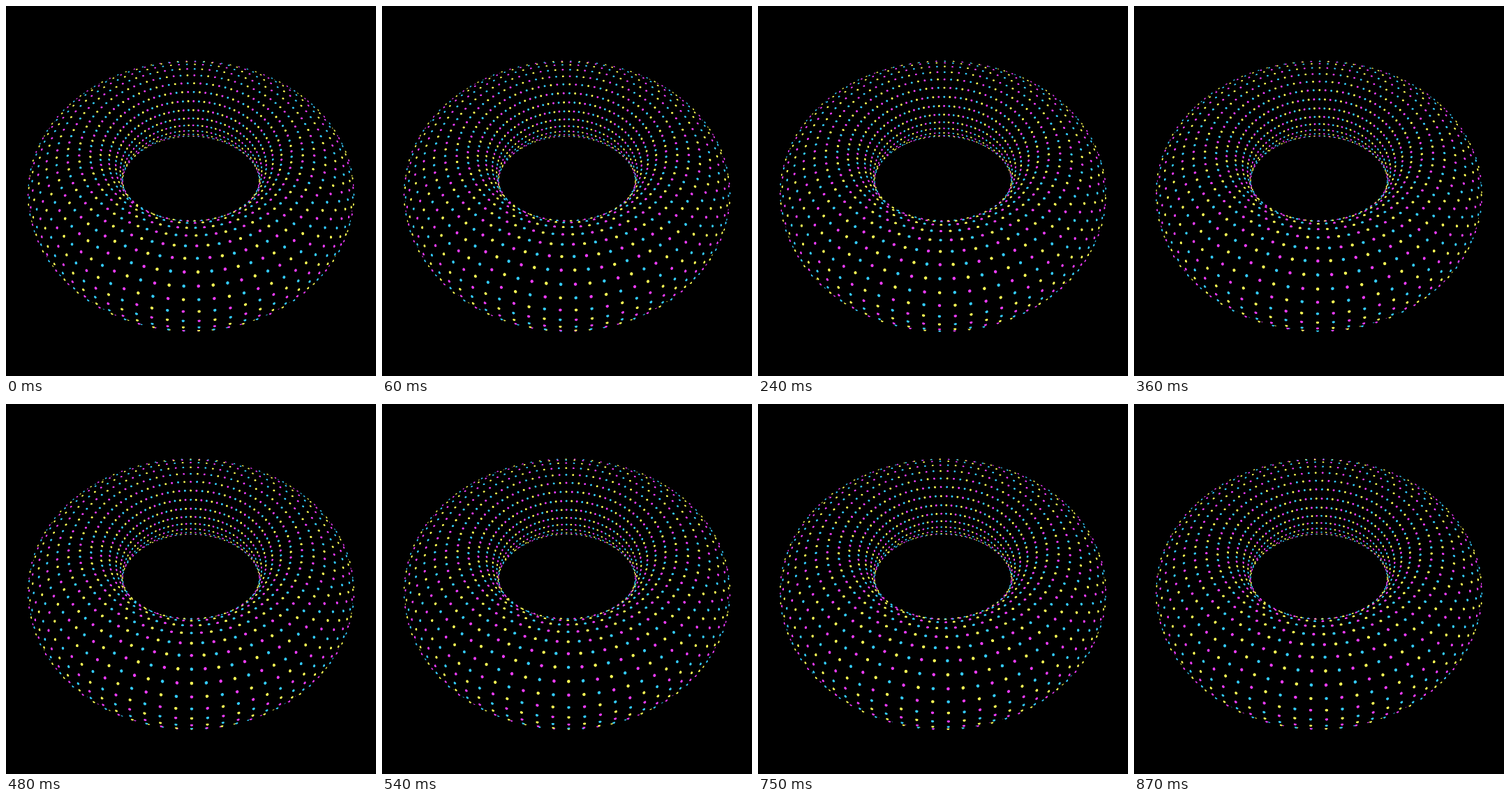
Recreate the animation shown at these times as an HTML page with a canvas. Size 530 by 530 pixels, loop 0.9 s.

```html
<!DOCTYPE html>
<html>
<head>
<meta charset="utf-8">
<style>
  html, body { margin: 0; width: 100%; height: 100%; overflow: hidden; background: #000; }
  canvas { display: block; }
</style>
</head>
<body>
<canvas id="stage" width="530" height="530"></canvas>
<script>
const ctx = document.getElementById('stage').getContext('2d');
const TAU = 2 * Math.PI;
const SIZE = 530, LOOP = 900, STEP = 30;
const COLUMNS = 84, ROWS = 28;
const TUBE = 0.3826;          // tube radius, the ring radius being 1
const DOT = 0.01;             // radius of the small spheres set into the surface
const FOCAL = 516, DISTANCE = 3.2318, RISE = 0.1854;
const TILT_SIN = 0.79015, TILT_COS = 0.61295;
const CAMERA_Y = DISTANCE * TILT_COS + RISE * TILT_SIN;
const CAMERA_Z = DISTANCE * TILT_SIN - RISE * TILT_COS;
const COLORS = ['#ffff55', '#33ccff', '#f03cff'];

// u runs around the ring, v around the tube.
function torusPoint(u, v, tube) {
  const radius = 1 + tube * Math.cos(v);
  return [radius * Math.sin(u), radius * Math.cos(u), tube * Math.sin(v)];
}

function project([x, y, z]) {
  const scale = FOCAL / (DISTANCE - y * TILT_COS - z * TILT_SIN);
  return {
    x: SIZE / 2 + x * scale,
    y: SIZE / 2 + (y * TILT_SIN - z * TILT_COS - RISE) * scale,
    scale
  };
}

// Cosine of the angle between the surface normal and the line of sight.
function facingAt(u, v, [x, y, z]) {
  const dx = -x, dy = CAMERA_Y - y, dz = CAMERA_Z - z;
  const dot = Math.cos(v) * (Math.sin(u) * dx + Math.cos(u) * dy) + Math.sin(v) * dz;
  return dot / Math.hypot(dx, dy, dz);
}

// The half of a small sphere that stands out of the black torus.
function drawDot(u, v, color) {
  const point = torusPoint(u, v, TUBE);
  const facing = facingAt(u, v, point);
  const sunk = facing < 0 ? TUBE * facing * facing / 2 / DOT : 0;
  if (sunk >= 1) return;
  const { x, y, scale } = project(point);
  const tip = project(torusPoint(u, v, TUBE + DOT));
  const outward = Math.atan2(tip.y - y, tip.x - x);
  const radius = DOT * scale, half = Math.acos(sunk);
  ctx.fillStyle = color;
  ctx.beginPath();
  ctx.arc(x, y, radius, outward - half, outward + half);
  if (facing > 0) {
    ctx.ellipse(x, y, radius * facing, radius, outward, TAU / 4, TAU * 3 / 4);
  }
  ctx.fill();
}

function draw(progress) {
  ctx.clearRect(0, 0, SIZE, SIZE);
  // Rows start on the hidden underside so the colour seam stays out of view.
  for (let row = -6; row < ROWS - 6; row++) {
    const v = (row + 0.217 + 2 * progress) / ROWS * TAU;
    for (let col = 0; col < COLUMNS; col++) {
      const u = (col - 0.49 + progress) / COLUMNS * TAU;
      drawDot(u, v, COLORS[(col + row + 6) % 3]);
    }
  }
}

function tick() {
  const time = performance.now() % LOOP;
  draw(Math.floor(time / STEP) * STEP / LOOP);
  requestAnimationFrame(tick);
}
tick();
</script>
</body>
</html>
```
